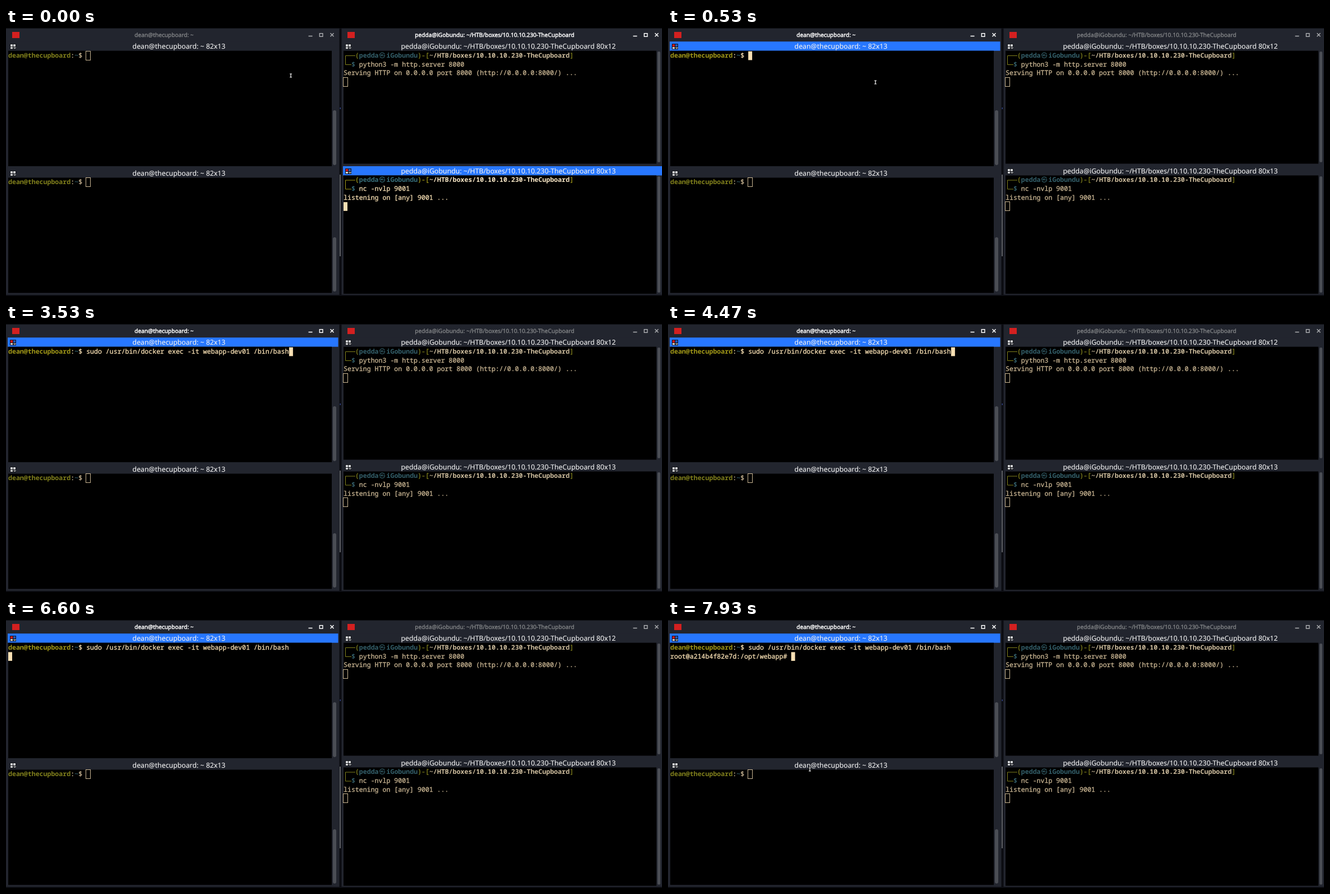
These frames come from a looping animation (1170x479 px, 8000 ms). An HTML page:

```html
<!DOCTYPE html>
<html lang="en">
<head>
<meta charset="utf-8">
<title>Terminals</title>
<style>
html, body { margin: 0; height: 100%; overflow: hidden; background: #0b0c11; }
svg { display: block; width: 1170px; height: 479px; }
text { white-space: pre; text-rendering: geometricPrecision; }
.mono { font: 11.595px "Noto Sans Mono", monospace; font-variant-ligatures: none; stroke-width: .3px; }
.bold { font-weight: 700; stroke-width: 0; }
.sans { font-family: "Noto Sans", sans-serif; text-anchor: middle; }
</style>
</head>
<body>
<svg id="stage" viewBox="0 0 1170 479"></svg>
<script>
const LOOP = 8000, STEP = 200 / 3, COL = 6.957, ROW = 15.67;
const FRAME = '#22252e', BLUE = '#2777ff';
const BRIGHT = { fg: '#f8e0b4', olive: '#a39a18', teal: '#38707c', white: '#fbe9c8' };
const DIM = { fg: '#cbb794', olive: '#82811c', teal: '#34606b', white: '#d0bf9f' };

const HOST = 'dean@thecupboard';
const PROJECT = '~/HTB/boxes/10.10.10.230-TheCupboard';
const REMOTE = 'pedda@iGobundu: ' + PROJECT;
const COMMAND = 'sudo /usr/bin/docker exec -it webapp-dev01 /bin/bash';
const ROOT = 'root@a214b4f82e7d:/opt/webapp# ';

const rect = (x, y, w, h, fill, extra = '') =>
  `<rect x="${x}" y="${y}" width="${w}" height="${h}" fill="${fill}" ${extra}/>`;
const path = (d, stroke, width = 1) =>
  `<path d="${d}" fill="none" stroke="${stroke}" stroke-width="${width}"/>`;
const label = (x, y, size, text, fill, weight = 0) =>
  `<text class="sans" x="${x}" y="${y}" font-size="${size}" fill="${fill}" stroke="${fill}" stroke-width="${weight}">${text}</text>`;

// Text and cursor helpers for one terminal, addressed by column and row
function terminal(x, y, active) {
  const colors = active ? BRIGHT : DIM;
  const put = (col, row, text, color = 'fg', bold = false) =>
    `<text class="mono${bold ? ' bold' : ''}" x="${x + col * COL}" y="${y + row * ROW + 11.2}" fill="${colors[color]}" stroke="${colors[color]}">${text}</text>`;
  const cursor = (col, row, on = true) => {
    const left = x + col * COL, top = y + row * ROW;
    if (!active) {
      return rect(Math.floor(left) - .5, Math.round(top) - .5, 8, 16, 'none', `stroke="${colors.fg}"`);
    }
    return on ? rect(left, top, COL, ROW, colors.fg) : '';
  };
  return { x, y, colors, put, cursor };
}

function hostPrompt(term) {
  const n = HOST.length;
  return term.put(0, 0, HOST, 'olive', true) + term.put(n, 0, ':') +
    term.put(n + 1, 0, '~', 'teal', true) + term.put(n + 2, 0, '$');
}

function boxPrompt(term, command, output) {
  const { x, y, put, colors } = term;
  return path(`M${x + 21} ${y + 7.8}H${x + 3.5}V${y + 23.8}H${x + 14}`, colors.olive) +
    put(3, 0, '(', 'olive') + put(4, 0, 'pedda', 'teal', true) +
    `<text x="${x + 9 * COL + 1}" y="${y + 11}" font-size="11" font-family="'Noto Sans CJK SC','Noto Sans CJK JP',sans-serif" fill="${colors.teal}">㉿</text>` +
    put(11, 0, 'iGobundu', 'teal', true) + put(19, 0, ')-[', 'olive') +
    put(22, 0, PROJECT, 'white', true) + put(58, 0, ']', 'olive') +
    put(2, 1, '$', 'teal', true) + put(4, 1, command) + put(0, 2, output) +
    term.cursor(0, 3);
}

function groupIcon(x, y, active) {
  const light = '#d5d6d8';
  return rect(x, y, 11, 10, '#111318') +
    rect(x + 1, y + 1, 4, 4, active ? '#e01818' : light) +
    rect(x + 6, y + 1, 4, 4, active ? '#2455b8' : light) +
    rect(x + 1, y + 6, 4, 3, light) +
    path(`M${x + 6.5} ${y + 7}h4l-2 2z`, light);
}

function pane(x, right, top, bottom, title, titleX, active) {
  return rect(x - 1, top, right - x + 12.5, 16.5, active ? BLUE : FRAME) +
    rect(x, top + 16.5, right - x, bottom - top - 16.5, '#000') +
    groupIcon(x + 3, top + 4, active) +
    label(titleX, top + 13, 12.3, title, '#f2f2f2', .1);
}

const thumb = (x, y, w, h) => rect(x, y, w, h, '#4b4e55', `rx="${w / 2}"`);

function titleBar(x, closeX, titleX, title, active) {
  const color = active ? '#fff' : '#858789';
  const button = active ? '#fff' : '#a9abae';
  return rect(x + 11, 7, 13, 11, '#d32020') +
    label(titleX, 16, 10.15, title, color, active ? .45 : .3) +
    path(`M${closeX - 42} 14.5h7`, button, 1.6) +
    path(`M${closeX - 22.2} 9.7h5.6v5.6h-5.6z`, button, 1.4) +
    path(`M${closeX - 3} 9.3l6 6m0-6l-6 6`, button, 1.5);
}

function pointer(t) {
  const between = (a, b) => Math.min(1, Math.max(0, (t - a) / (b - a)));
  let x, y;
  if (t < 2660) {
    const p = between(0, 530), ease = p * p * (3 - 2 * p);
    x = 508 - 138 * ease;
    y = 85 + 12 * ease;
  } else if (t > 7590) {
    const p = between(7530, 7930);
    x = 370 - 117 * p;
    y = 97 + 170 * p;
  } else return '';
  const shape = `M${x - 2} ${y - 3}h4m-2 0v6m-2 0h4`;
  return path(shape, '#000', 3) + path(shape, '#fff', 1.2);
}

// The cursor is lit for 600 ms after each key press, then blinks
function lit(t) {
  const key = [530, 2600, 3270, 6330].filter(k => k <= t + 5).pop() ?? 0;
  return Math.floor((t - key + 5) / 600) % 2 === 0;
}

function session(term, t) {
  const typed = t < 2860 ? '' : t < 3520 ? 'clear' : COMMAND;
  const start = HOST.length + 4;
  const entered = t > 6590, ready = t > 6720;
  const col = entered ? (ready ? ROOT.length : 0) : start + typed.length;
  return hostPrompt(term) + term.put(start, 0, typed) +
    (ready ? term.put(0, 1, ROOT) : '') +
    term.cursor(col, entered ? 1 : 0, lit(t));
}

function scene(t) {
  const left = t > 520;
  const upper = terminal(4, 41.7, left), lower = terminal(4, 268.2, false);
  const server = terminal(602, 41.7, false), listener = terminal(602, 264.2, !left);
  return rect(0, 0, 1170, 479, '#0b0c11') +
    rect(0, 1, 594.5, 476, FRAME) + rect(598.5, 1, 571.5, 476, FRAME) +
    rect(595.5, 262, 1, 146, '#b8bac0') + rect(595.5, 142, 1.5, 3, '#34458c') +
    titleBar(0, 581.5, 282, HOST + ': ~', left) +
    titleBar(598, 1160.5, 871.5, REMOTE, !left) +
    pane(4, 581, 24.2, 247, HOST + ': ~ 82x13', 308.5, left) +
    pane(4, 581, 251, 473.5, HOST + ': ~ 82x13', 308.5, false) +
    pane(602, 1160, 24.2, 242.5, REMOTE + ' 80x12', 896, false) +
    pane(602, 1160, 247, 475, REMOTE + ' 80x13', 896, !left) +
    thumb(583, 147, 6, 98) + thumb(583, 374, 6, 97) +
    thumb(1162, 42, 5, 198) + thumb(1162, 265, 5, 208) +
    session(upper, t) +
    hostPrompt(lower) + lower.cursor(HOST.length + 4, 0) +
    boxPrompt(server, 'python3 -m http.server 8000',
      'Serving HTTP on 0.0.0.0 port 8000 (http://0.0.0.0:8000/) ...') +
    boxPrompt(listener, 'nc -nvlp 9001', 'listening on [any] 9001 ...') +
    pointer(t);
}

const stage = document.getElementById('stage');
const begin = performance.now();
let shown = -1;
function draw() {
  const tick = Math.floor(((performance.now() - begin) % LOOP + 3.4) / STEP) % 120;
  if (tick !== shown) stage.innerHTML = scene((shown = tick) * STEP);
  requestAnimationFrame(draw);
}
draw();
</script>
</body>
</html>
```
